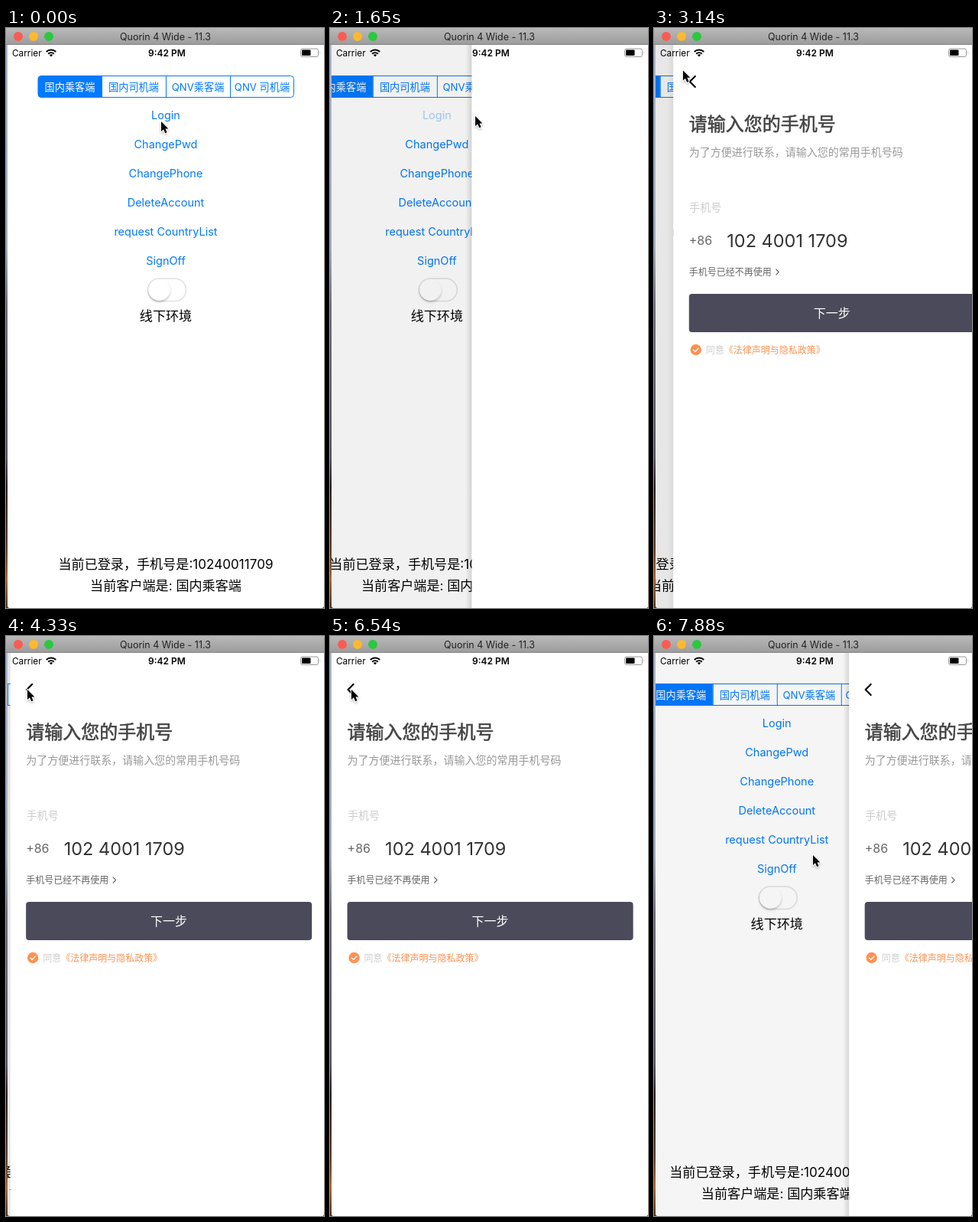
Recreate the animation shown at these times as an HTML page. Size 416 by 757 pixels, loop 8 s.

```html
<!DOCTYPE html>
<html lang="zh-CN">
<head>
<meta charset="utf-8">
<style>
html, body { margin: 0; width: 100%; height: 100%; overflow: hidden; background: #fff; }
svg { display: block; width: 100vw; height: 100vh; }
text { font-family: Inter, "Noto Sans CJK SC", "Noto Sans CJK", sans-serif; white-space: pre; }
.mid { text-anchor: middle; }
.link { font-size: 14.5px; fill: #007aff; text-anchor: middle; }
.seg { font-size: 13.2px; fill: #007aff; text-anchor: middle; }
.label { font-size: 17.1px; text-anchor: middle; }
.s12 { font-size: 12px; }
.s14 { font-size: 14px; }
.line { fill: none; stroke-linecap: round; stroke-linejoin: round; }
</style>
</head>
<body>
<svg viewBox="0 0 416 757" preserveAspectRatio="none">
  <defs>
    <linearGradient id="desktop" x2="0" y2="1">
      <stop offset="0" stop-color="#a9b9d0"/>
      <stop offset=".38" stop-color="#a3adc0"/>
      <stop offset=".48" stop-color="#6c6a78"/>
      <stop offset=".74" stop-color="#55505c"/>
      <stop offset=".79" stop-color="#241d20"/>
      <stop offset=".9" stop-color="#5c3a28"/>
      <stop offset=".95" stop-color="#a8662f"/>
      <stop offset="1" stop-color="#4a3024"/>
    </linearGradient>
    <linearGradient id="titleBar" x2="0" y2="1">
      <stop offset="0" stop-color="#b9b9b9"/>
      <stop offset="1" stop-color="#9b9b9b"/>
    </linearGradient>
    <linearGradient id="edge">
      <stop offset="0" stop-opacity="0"/>
      <stop offset="1" stop-opacity=".13"/>
    </linearGradient>
    <filter id="soft" x="-50%" y="-50%" width="200%" height="200%">
      <feDropShadow dx="0" dy="2" stdDeviation="1.5" flood-opacity=".25"/>
    </filter>
    <clipPath id="device"><rect x="2" y="10" width="414" height="747" rx="3"/></clipPath>
  </defs>

  <rect width="416" height="757" fill="url(#desktop)"/>
  <g clip-path="url(#device)">
    <rect x="2" y="22" width="414" height="735" fill="#fff"/>
    <g id="home">
      <path d="M125 62.5H46a4 4 0 0 0-4 4V86.500a4 4 0 0 0 4 4H125z" fill="#007aff"/>
      <rect x="42" y="62.5" width="334.500" height="28" rx="4" fill="none" stroke="#007aff"/>
      <path d="M125.500 62v29M209.500 62v29M293.500 62v29" stroke="#007aff"/>
      <text class="seg" x="83.500" y="81.500" style="fill:#fff">国内乘客端</text>
      <text class="seg" x="167" y="81.500">国内司机端</text>
      <text class="seg" x="251" y="81.500">QNV乘客端</text>
      <text class="seg" x="335" y="81.500">QNV 司机端</text>
      <text class="link" x="209" y="118.500" id="login">Login</text>
      <text class="link" x="209" y="156.500">ChangePwd</text>
      <text class="link" x="209" y="194.500">ChangePhone</text>
      <text class="link" x="209" y="232.500">DeleteAccount</text>
      <text class="link" x="209" y="270.500">request CountryList</text>
      <text class="link" x="209" y="308.500">SignOff</text>
      <rect x="185.500" y="327" width="50" height="29.500" rx="14.750" fill="none" stroke="#e1e1e1" stroke-width="1.500"/>
      <circle cx="200.500" cy="341.700" r="14" fill="#fff" filter="url(#soft)"/>
      <text class="label" x="209" y="382">线下环境</text>
      <text class="label" x="209" y="706">当前已登录，手机号是:10240011709</text>
      <text class="label" x="209" y="734">当前客户端是: 国内乘客端</text>
    </g>
    <rect id="dim" x="2" y="22" width="414" height="735"/>

    <g id="panel">
      <rect id="shadow" x="-8" y="22" width="8" height="735" fill="url(#edge)"/>
      <rect y="22" width="416" height="735" fill="#fff"/>
      <g id="form">
        <path class="line" d="M28.500 63L21.500 70L28.500 77" stroke="#000" stroke-width="2.200"/>
        <text x="20.500" y="133.500" font-size="24" fill="#444" stroke="#444" stroke-width=".6">请输入您的手机号</text>
        <text class="s14" x="20.500" y="167" fill="#999">为了方便进行联系，请输入您的常用手机号码</text>
        <text class="s14" x="21" y="238.500" fill="#ccc">手机号</text>
        <text x="20.500" y="283" font-size="16" fill="#666">+86</text>
        <text x="70" y="286" font-size="23.500" fill="#333">102 4001 1709</text>
        <text class="s12" x="20.500" y="323" fill="#666">手机号已经不再使用</text>
        <path class="line" d="M134.500 315L138 318.500L134.500 322" stroke="#666" stroke-width="1.100"/>
        <rect x="20.500" y="347" width="374" height="50" rx="4" fill="#4a4a5a"/>
        <text class="mid" x="207.500" y="378" font-size="16" fill="#fff">下一步</text>
        <circle cx="29.500" cy="420" r="7.200" fill="#ff9152"/>
        <path class="line" d="M26.300 420.200L28.700 422.500L32.800 418" stroke="#fff" stroke-width="1.200"/>
        <text class="s12" x="42.500" y="424.500" fill="#ccc">同意<tspan fill="#ff9152">《法律声明与隐私政策》</tspan></text>
      </g>
    </g>

    <text x="8" y="37" font-size="11.800">Carrier</text>
    <path d="M52.800 31a9 9 0 0 1 12.400 0M55.200 33.700a5.600 5.600 0 0 1 7.600 0" fill="none" stroke="#000" stroke-width="2.100"/>
    <path d="M56.900 35.200a3 3 0 0 1 4.200 0L59 37.500z"/>
    <text class="mid" x="210.500" y="37" font-size="12" font-weight="600">9:42 PM</text>
    <rect x="385.500" y="27" width="23" height="10.500" rx="2.500" fill="none" stroke="#999"/>
    <rect x="387" y="28.500" width="11.500" height="7.500" rx="1"/>
    <path d="M410 30.500q1.500 1.700 0 3.500z" fill="#999"/>
  </g>

  <rect width="416" height="22" fill="url(#titleBar)"/>
  <path d="M0 21.500H416" stroke="#858585"/>
  <circle cx="16" cy="11" r="6" fill="#fc5b55"/>
  <circle cx="36" cy="11" r="6" fill="#fdb92f"/>
  <circle cx="56" cy="11" r="6" fill="#2bc840"/>
  <text class="mid" x="208.500" y="16" font-size="12.500" fill="#222">Quorin 4 Wide - 11.3</text>

  <g id="cursor">
    <path d="M0 0V13L3 10.300L5.200 15.300L7.600 14.300L5.400 9.400H9.400Z" stroke="#fff" stroke-width="1.600" paint-order="stroke" filter="url(#soft)"/>
  </g>
</svg>
<script>
const $ = id => document.getElementById(id);
const LOOP = 8000, TICK = 148.6, WIDTH = 414;
const PUSH = 630, POP = 6763, FORM_SHOWN = 1780;
// time, x, y of the pointer tip
const POINTER = [
  [0, 203, 122], [700, 203, 122], [1650, 190, 115], [3140, 37, 55],
  [4000, 28, 70], [6600, 28, 70], [7140, 90, 113], [7880, 208, 286], [8000, 208, 286]
];

// Critically damped spring: distance left, from 1 to 0
function spring(ms) {
  const a = Math.max(0, ms) * 0.00184;
  return (1 + a) * Math.exp(-a);
}

function pointerAt(t) {
  const i = POINTER.findIndex(p => p[0] > t);
  const [t0, x0, y0] = POINTER[i - 1], [t1, x1, y1] = POINTER[i];
  const k = (t - t0) / (t1 - t0);
  return [x0 + (x1 - x0) * k, y0 + (y1 - y0) * k];
}

function loginOpacity(t) {
  if (t < 440) return 1;
  return Math.min(1, 0.2 + 0.8 * Math.max(0, t - 700) / 4700);
}

function move(id, x, y = 0) {
  $(id).setAttribute('transform', `translate(${x} ${y})`);
}

function draw(now) {
  const t = Math.floor((now % LOOP) / TICK) * TICK + 10;
  const away = t < POP ? spring(t - PUSH) : 1 - spring(t - POP);
  const covered = 1 - away;
  move('home', -0.3 * WIDTH * covered);
  move('panel', 2 + WIDTH * away);
  move('cursor', ...pointerAt(t));
  $('dim').setAttribute('opacity', 0.1 * covered);
  $('shadow').setAttribute('opacity', Math.min(1, away * 8, covered * 8));
  $('login').setAttribute('opacity', loginOpacity(t));
  $('form').setAttribute('visibility', t < FORM_SHOWN ? 'hidden' : 'visible');
}

const start = performance.now();
function loop() {
  draw(performance.now() - start);
  requestAnimationFrame(loop);
}
loop();
</script>
</body>
</html>
```
